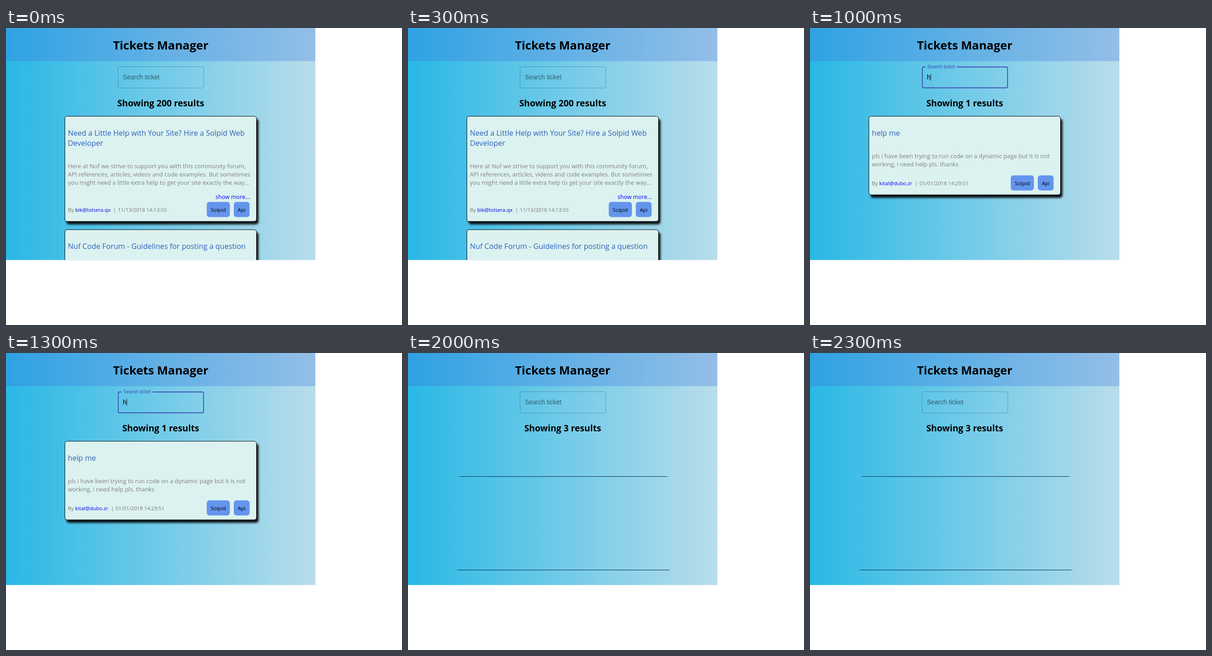
An HTML page that plays this animation: 864 px wide and 648 px high, repeating every 2500 ms.

```html
<!DOCTYPE html>
<html lang="en">
<head>
<meta charset="utf-8">
<title>Tickets Manager</title>
<style>
html, body { margin: 0; width: 100%; height: 100%; overflow: hidden; background: #fff; }
svg { display: block; font-family: "Open Sans", sans-serif; }
.heading { font-weight: 700; font-size: 25.4px; text-anchor: middle; }
.count { font-weight: 700; font-size: 19.3px; }
.mid { text-anchor: middle; }
.note { font-size: 16.1px; }
.title { font-size: 16.2px; fill: #2d61b8; }
.body { font-size: 12.9px; fill: #808080; }
.more { font-size: 12.5px; fill: #00f; text-anchor: end; }
.meta { font-size: 11.2px; fill: #777; }
.mail { font-size: 11.2px; fill: #0000e6; }
.tag { font-size: 11.4px; text-anchor: middle; }
.ui { font-family: "Liberation Sans", Arial, sans-serif; font-size: 13.84px; }
.hint { fill: rgba(0,0,0,.54); }
.restore { font-size: 17px; fill: #2d61b8; }
.hide { fill: #e00000; }
.label { font-size: 10.38px; fill: #3f51b5; }
.card { fill: #dcf2f0; stroke: #000; filter: drop-shadow(4.2px 6.2px 2px rgba(0,0,0,.9)); }
.chip { fill: #6495ed; }
</style>
</head>
<body>
<svg width="864" height="648" viewBox="0 0 864 648">
  <defs>
    <linearGradient id="sky"><stop stop-color="#29b8e5"/><stop offset="1" stop-color="#b9ddeb"/></linearGradient>
    <linearGradient id="bar"><stop stop-color="#2fa2e3"/><stop offset="1" stop-color="#94bee7"/></linearGradient>
    <clipPath id="page"><rect width="675" height="506.25"/></clipPath>
  </defs>
  <g clip-path="url(#page)">
    <rect width="675" height="507" fill="url(#sky)"/>
    <rect width="675" height="72.3" fill="url(#bar)"/>
    <text class="heading" x="337.5" y="47">Tickets Manager</text>
    <g id="view"></g>
  </g>
</svg>
<script>
const text = (cls, x, y, str) => `<text class="${cls}" x="${x}" y="${y}">${str}</text>`;
const lines = (cls, y, step, rows) => rows.map((row, i) => text(cls, 135, y + i * step, row)).join("");
const box = (cls, x, y, w, h, r) => `<rect class="${cls}" x="${x}" y="${y}" width="${w}" height="${h}" rx="${r}"/>`;
const card = (y, h, x = 128.5, w = 418) => box("card", x, y, w, h, 5);
const title = (y, ...rows) => lines("title", y, 22.8, rows);
const body = (y, ...rows) => lines("body", y, 17.8, rows);
const more = y => text("more", 532, y, "show more...");
const count = n => text("count mid", 337.5, 170.5, `Showing ${n} results`);

const byline = (y, mail, date, dateX) =>
  text("meta", 135, y, "By") + text("mail", 151, y, mail) +
  text("meta", dateX - 10, y, "|") + text("meta", dateX, y, date);

const tags = y =>
  box("chip", 438, y, 50.5, 33, 6) + text("tag", 463.2, y + 21.5, "Solpid") +
  box("chip", 497, y, 34.5, 33, 6) + text("tag", 514.2, y + 21.5, "Api");

const search =
  `<rect x="244.5" y="84.5" width="187" height="46.5" rx="3.5" fill="none" stroke="#000" stroke-opacity=".25"/>` +
  text("ui hint", 255, 112, "Search ticket");

const searchFocused =
  `<path d="M252 85H248a3 3 0 0 0-3 3v39.5a3 3 0 0 0 3 3H428a3 3 0 0 0 3-3V88a3 3 0 0 0-3-3H320" fill="none" stroke="#3f51b5" stroke-width="1.8"/>` +
  text("ui label", 256, 88, "Search ticket") + text("ui", 255, 112, "h") +
  `<path d="M263.5 100v15" stroke="#111"/>`;

const helpCard = card(192.5, 171.5) + title(234.5, "help me") +
  body(284, "pls i have been trying to run code on a dynamic page but it is not",
    "working, i need help pls. thanks") +
  byline(343, "kital@dubo.zr", "01/01/2018 14:29:51", 239) + tags(321.5);

// A card turned edge-on
const edge = (x, y, w) =>
  `<path d="M${x} ${y + 1}l6-1h${w - 12}l6 1z" fill="#06294a"/>`;

const scenes = [
  search + count(200) + card(192.5, 229.5) +
    title(234.5, "Need a Little Help with Your Site? Hire a Solpid Web", "Developer") +
    body(306.3, "Here at Nuf we strive to support you with this community forum,",
      "API references, articles, videos and code examples. But sometimes",
      "you might need a little extra help to get your site exactly the way…") +
    more(373) + byline(401, "bik@tolsera.qx", "11/13/2018 14:13:55", 244) + tags(379.5) +
    card(440, 120) + title(482, "Nuf Code Forum - Guidelines for posting a question"),

  search + count(3) + helpCard + card(381.8, 160) + title(423.5, "Adding Ads.txt file") +
    body(472.5, "Hi, I have a new blog that's been up for a couple of months and",
      "would like to hook up an ads.txt file so that we can make a few",
      "cents to offset the work we're putting into this. I asked for help via"),

  searchFocused + count(1) + helpCard,

  search + text("count", 148, 170.5, "Showing 3 results") +
    text("note", 316, 170.5, "( 2") + text("note", 344, 170.5, "hidden tickets -") +
    text("ui restore", 464, 170.5, "restore") + text("note", 522, 170.5, ")") +
    card(243.5, 215, 124.5, 426) + title(289.5, "Notifications not working") +
    text("ui hide", 509, 286, "hide") +
    body(338.5, "Hi I was working with nuf crm backend notificatication and just",
      "stoped working. See the code bellow CRM Backend code import",
      "nufCrm from 'nuf-crm-backend'; export function…") +
    more(405) + byline(433, "gindobar@poszel.qy", "07/12/2018 22:34:00", 286),

  search + count(3) + edge(110, 269, 459) + edge(105, 473, 469)
];

const view = document.getElementById("view");
const start = performance.now();
let shown = -1;
function draw() {
  const scene = Math.floor((performance.now() - start) / 500) % scenes.length;
  if (scene !== shown) view.innerHTML = scenes[shown = scene];
  requestAnimationFrame(draw);
}
draw();
</script>
</body>
</html>
```
